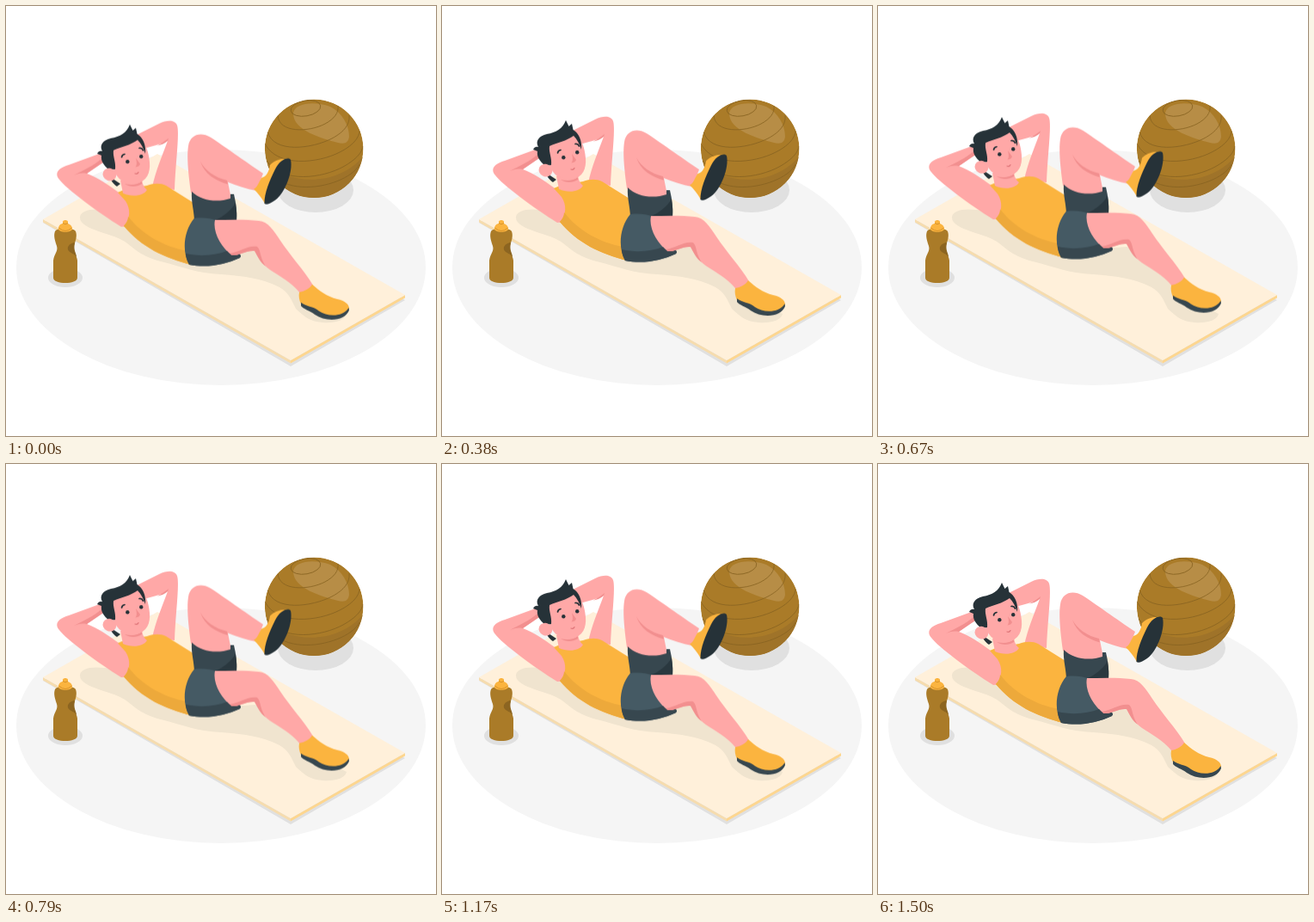
Animation, 500 px wide and 500 px high, one loop 1540 ms. Source, as an HTML page:

```html
<!DOCTYPE html>
<html lang="en">
<head>
<meta charset="utf-8">
<title>Crunches</title>
<style>
  html, body { margin: 0; width: 100%; height: 100%; overflow: hidden; background: #fff; }
  svg { display: block; width: 100vw; height: 100vh; }
  .skin { fill: #ffa8a7; }
  .blush { fill: #f28f8f; }
  .gold { fill: #fbb43f; }
  .goldDark { fill: #eda93b; }
  .brown { fill: #aa7b28; }
  .ink { fill: #263238; }
  .slate { fill: #455a64; }
  .slateDark { fill: #37474f; }
  .shade { fill: #e0e0e0; }
  .seam { fill: none; stroke: #876321; stroke-width: .8; }
  .line { fill: none; stroke: #263238; stroke-width: 1.7; stroke-linecap: round; }
</style>
</head>
<body>
<svg viewBox="0 0 500 500">
  <defs>
    <clipPath id="round"><circle cx="358.200" cy="165.700" r="57.300"/></clipPath>
  </defs>

  <ellipse cx="250" cy="304" rx="238" ry="137" fill="#f5f5f5"/>

  <!-- ball -->
  <ellipse class="shade" cx="360" cy="214" rx="44" ry="26"/>
  <g clip-path="url(#round)">
    <circle class="brown" cx="358.200" cy="165.700" r="57.300"/>
    <path d="M300 180C325 208 385 212 416 174V226H300Z" fill="#9f7329"/>
    <path d="M334 125C335 113 358 110 377 117C391 124 399 139 399 152C398 159 394 161 386 159C368 154 334 145 334 125Z" fill="#b78d46"/>
    <g class="seam">
      <ellipse cx="348.500" cy="119" rx="17.500" ry="9" transform="rotate(-10 348 119)"/>
      <path d="M316 127C317 148 352 147 371 137C382 131 387 124 386 116"/>
      <path d="M304 146C311 172 356 166 379 154C394 146 400 137 399 127"/>
      <path d="M301 160C315 188 363 183 388 170C406 161 411 151 411 145"/>
      <path d="M303 180C322 207 368 200 392 187C408 178 414 170 415 163"/>
      <path d="M311 198C331 216 367 212 389 202C402 196 408 190 411 184"/>
    </g>
  </g>

  <!-- mat -->
  <path class="shade" d="M43 252L176 176L464 342L331 419Z"/>
  <path d="M43 248L331 412V415.500L43 251.500Z" fill="#f6dcae"/>
  <path d="M464 336L331 412V415.500L464 339.500Z" fill="#fdd68f"/>
  <path d="M43 248L176 172L464 336L331 412Z" fill="#fff0da"/>
  <path d="M86 246C86 238 99 235 114 237L140 240L215 285L290 280L345 325L380 350L396 358C394 366 382 369 368 368C352 367 346 360 337 352C332 342 329 333 318 327C296 316 276 314 250 312C222 311 204 303 184 298C161 293 151 284 141 276C127 264 86 261 86 246Z" fill="#f0e4cf"/>

  <!-- bottle -->
  <ellipse class="shade" cx="69" cy="316" rx="20" ry="11"/>
  <path class="brown" d="M57 262C55 267 57 273 59 279C61 285 56 288 55 296V316C55 324 83 324 83 316V296C82 289 78 286 79 279C81 273 83 267 81 262C77 257 61 257 57 262Z"/>
  <path d="M80 275C73 276 70 281 73 285C76 288 80 288 82 292C82 287 78 285 80 275Z" fill="#8c6521"/>
  <path class="gold" d="M61 259C61 255 64 253 66 253V250.500C67 248.500 71 248.500 72 250.500V253C75 254 77 256 77 259C77 264 61 264 61 259Z"/>
  <path d="M66 252.500Q69 255 72 252.500M61.500 258Q69 265 76.500 258" fill="none" stroke="#d9942b" stroke-width="1"/>

  <g data-lift="9.400">
    <!-- far arm -->
    <path class="skin" d="M152 150L178 137C187 133 196 132 199 139C202 148 197 184 196 214L170 211C174 192 181 176 188 157C180 161 170 163 160 166Z"/>
    <path class="blush" d="M176 162.500C181 160 185 157 189 154L188 157C185 160 180 162 176 162.500Z"/>
    <!-- near arm -->
    <path class="skin" d="M114 170L73 185C60 189 56 195 62 202C69 212 108 241 134 257L148 256V225L131 217C119 208 107 200 94 195L113 182Z"/>
    <path class="blush" d="M79 197C90 191 102 186 111 178L113 182L94 195C88 194 84 195 79 197Z"/>
  </g>

  <g data-lift="9.200">
    <!-- shirt -->
    <path class="gold" d="M130 217L137 214L164 209C172 206 180 206 186 209L218 229L222 250L215 301C184 293 158 281 137 256C145 248 145 236 139 227Z"/>
    <path class="goldDark" d="M137 256C140 253 142 249 142 245C158 266 185 281 211 285L215 301C184 293 158 281 137 256Z"/>
  </g>

  <g data-lift="9.400">
    <!-- neck and head -->
    <path class="skin" d="M133 203L158 200C158 206 160 211 164 214C160 221 147 223 136 218Z"/>
    <path class="blush" d="M138 207C146 209 153 208 158 204L158 207C152 211 144 211 138 207Z"/>
    <path class="ink" d="M121 199L133 207L129 210C126 208 122 204 121 199Z"/>
    <path class="skin" d="M122 168L125 190C130 204 140 208 151 207C164 204 168 194 167 182C166 171 163 161 156 153Z"/>
    <path class="ink" d="M120 191C113 185 110 180 111 174L106 172Q108 168 112 169C108 162 113 156 122 154C133 152 140 148 144 138L147.500 145L151 142L152.500 149C159 153 163 161 162 172C160 166 157 160 153 156C145 162 134 164 125 168C124 176 128 181 127 190Z"/>
    <ellipse class="skin" cx="120.500" cy="196" rx="8" ry="7.200" transform="rotate(25 120 196)"/>
    <path class="line" d="M134.500 176Q135 173 138 172.500M155 165.500Q158 165 159.500 168"/>
    <circle class="ink" cx="141.300" cy="181.300" r="2.200"/>
    <circle class="ink" cx="157.200" cy="175.200" r="2.200"/>
    <path class="blush" d="M151 177L156 184Q155 187 150.500 187.500Q153 185 151 177Z"/>
    <path d="M150 195Q153 196 154 193.500" fill="none" stroke="#df7478" stroke-width="1.200" stroke-linecap="round"/>
  </g>

  <g data-lift="8.900">
    <!-- raised leg -->
    <path class="skin" d="M215 217C212 195 210 176 212 163C214 150 226 146 238 153C252 162 278 181 299 195L291 215C280 213 268 209 258 205L262 225C246 233 225 228 215 217Z"/>
    <path class="blush" d="M226 181C231 191 243 200 257 203L258 207.500C243 203 231 196 226 181Z"/>
    <path class="gold" d="M288 213C292 212 294 205 297 200C303 199 306 192 307 185C312 180 320 177 328 178L318 195L301 230C297 223 293 218 288 213Z"/>
    <path class="ink" d="M300.500 230C300 218 307 202 313 190C318 180 327 175 331 179C334 192 325 217 313 226C307 230 303 232 300.500 230Z"/>
    <path class="slateDark" d="M216 216C227 227 246 229 261 224L261 219L265 219Q269 235 268 252L219 251C219 239 215 228 216 216Z"/>
    <path d="M242 250C253 245 262 238 267 229Q269 241 268 252Z" fill="#2a383f"/>

    <!-- planted leg -->
    <path class="slateDark" d="M255 285L272 288L273 292C267 295 260 297 255 298Z"/>
    <path class="skin" d="M240 249C259 249 278 248 294 250C305 251 311 261 319 273C331 291 347 308 357 325C355 331 347 335 341 333C332 322 318 314 307 307C297 300 293 292 289 285C280 284 272 290 261 291C250 285 241 270 240 249Z"/>
    <path class="blush" d="M260 288C272 286 282 278 292 280C297 285 294 290 302 303C296 299 293 292 289 285C280 284 272 290 261 291Z"/>
    <path class="slate" d="M219 247C229 246 238 247 243 249C240 263 250 280 262 290L273 290L272 293C255 301 234 305 213 301C204 285 207 261 219 247Z"/>
    <path class="slateDark" d="M209 288C226 292 244 290 257 285L262 290L273 290L272 293C255 301 234 305 213 301C211 297 209 293 209 288Z"/>
    <path class="gold" d="M341 333C347 332 353 329 356 324C364 331 373 338 385 341C394 343 399 347 399 352C392 364 372 364 362 357C355 351 348 350 343 347C341 342 340 338 341 333Z"/>
    <path class="slateDark" d="M343 345C349 350 357 349 364 355C374 362 392 362 398.500 351L399 354C394 367 372 368 359 359C353 354 346 353 343 349Z"/>
  </g>
</svg>
<script>
  const HALF = 770, LEAD = 35;
  for (const part of document.querySelectorAll('[data-lift]')) {
    const move = part.animate(
      { transform: ['translateY(0px)', `translateY(${-part.dataset.lift}px)`] },
      {
        duration: HALF,
        delay: -LEAD,
        direction: 'alternate',
        iterations: Infinity,
        easing: 'cubic-bezier(.3, .18, .7, .82)'
      }
    );
    move.startTime = document.timeline.currentTime;
  }
</script>
</body>
</html>
```
